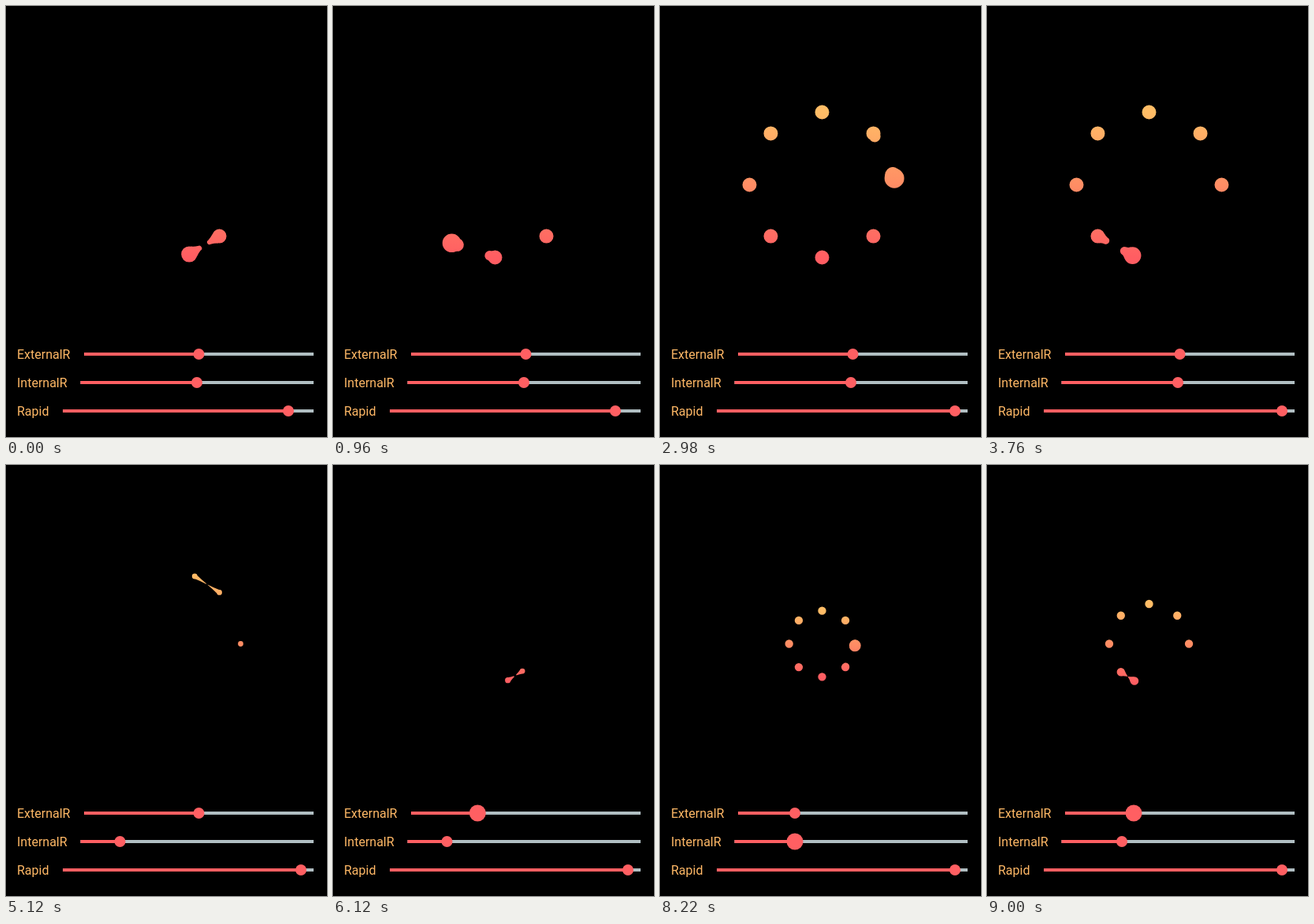
Recreate the animation shown at these times as an HTML page. Size 407 px wide and 546 px high, loop 9.02 s.

```html
<!DOCTYPE html>
<html lang="en">
<head>
<meta charset="utf-8">
<title>Loading ring</title>
<style>
html, body { margin: 0; width: 100%; height: 100%; overflow: hidden; background: #000; }
svg { display: block; width: 100vw; height: 100vh; }
text { font: 16px Roboto, sans-serif; fill: #ffb866; }
</style>
</head>
<body>
<svg id="stage" viewBox="0 0 407 546">
  <defs>
    <linearGradient id="glow" gradientUnits="userSpaceOnUse" x1="0" x2="0">
      <stop offset="0" stop-color="#ffbd66"/>
      <stop offset="1" stop-color="#ff5d62"/>
    </linearGradient>
  </defs>
  <path id="tails" fill="url(#glow)"/>
  <path id="dots" fill="url(#glow)"/>
</svg>
<script>
const LOOP = 9020, CX = 205.5, CY = 226.5, STEP = 45, TRACK_END = 390;
const stage = document.getElementById('stage');
const glow = document.getElementById('glow');
const tails = document.getElementById('tails');
const dots = document.getElementById('dots');

// Angle travelled by the ball, in degrees, as [ms, value] pairs.
const travel = [[0, 73], [1450, 154], [1580, 163.8], [1710, 179.5], [1880, 203],
  [2980, 354.7], [3760, 463], [5120, 651.4], [7400, 968.6], [9020, 1194.2]];

const sliders = [
  { label: 'ExternalR', y: 441, start: 99, presses: [[5400, 6330], [8650, 9900]],
    knob: [[5480, 244.5], [6250, 171], [8750, 171], [8980, 186]] },
  { label: 'InternalR', y: 477, start: 94.5, presses: [[3820, 4480], [7750, 8230]],
    knob: [[3900, 242], [4400, 144.5], [7850, 144.5], [8150, 171]] },
  { label: 'Rapid', y: 513, start: 72, presses: [[1350, 1730]],
    knob: [[1450, 358], [1710, 374]] }
];
const [external, internal] = sliders;

const clamp = v => Math.max(0, Math.min(1, v));

function lerpKeys(keys, t) {
  if (t <= keys[0][0]) return keys[0][1];
  for (let i = 1; i < keys.length; i++) {
    const [t0, v0] = keys[i - 1], [t1, v1] = keys[i];
    if (t <= t1) return v0 + (v1 - v0) * (t - t0) / (t1 - t0);
  }
  return keys[keys.length - 1][1];
}

function add(tag, attrs) {
  const el = document.createElementNS('http://www.w3.org/2000/svg', tag);
  set(el, attrs);
  return stage.appendChild(el);
}

function set(el, attrs) {
  for (const name in attrs) el.setAttribute(name, attrs[name]);
}

for (const s of sliders) {
  add('text', { x: 14, y: s.y + 6 }).textContent = s.label;
  const line = { x1: s.start, y1: s.y, x2: TRACK_END, y2: s.y, 'stroke-width': 4 };
  add('line', { ...line, stroke: '#b0bec2' });
  s.fill = add('line', { ...line, stroke: '#ff5f62' });
  s.handle = add('circle', { cy: s.y, fill: '#ff5f62' });
}

function drawSlider(s, t) {
  const x = lerpKeys(s.knob, t);
  const press = Math.max(...s.presses.map(([a, b]) =>
    Math.min(clamp((t - a) / 100), clamp((b + 100 - t) / 100))));
  set(s.fill, { x2: x });
  set(s.handle, { cx: x, r: 7 + 3.5 * press });
}

const fraction = (s, t) => (lerpKeys(s.knob, t) - s.start) / (TRACK_END - s.start);

function onRing(deg, ring, r) {
  const a = deg * Math.PI / 180;
  return { x: CX + ring * Math.cos(a), y: CY + ring * Math.sin(a), r };
}

const circle = ({ x, y, r }) =>
  `M${x - r} ${y}a${r} ${r} 0 1 1 ${2 * r} 0a${r} ${r} 0 1 1 ${-2 * r} 0Z`;

// Taper from one circle towards another; gap is 0 when they coincide, 1 a full step apart.
function tail(from, to, gap) {
  const dx = to.x - from.x, dy = to.y - from.y, dist = Math.hypot(dx, dy);
  if (dist < 0.01) return '';
  const { x, y, r } = from, ux = dx / dist, uy = dy / dist;
  const at = (along, across) =>
    `${x + ux * along - uy * across} ${y + uy * along + ux * across}`;
  const loose = clamp(2 * gap - 1);
  const linked = gap < 0.5;
  const width = linked ? 0.77 * r * (1 - 2 * gap) : r * loose ** 0.8;
  const reach = linked ? dist / 2 : r + (dist / 2 - r) * (1 - loose) ** 1.5;
  const end = linked ? reach : reach - width;
  const rootX = 0.64 * r, rootY = 0.77 * r;
  const midX = (rootX + end) / 2, midY = (rootY + width) / 2 - 0.08 * r;
  const cap = linked ? `L${at(end, width)}` : `A${width} ${width} 0 0 1 ${at(end, width)}`;
  return `M${at(rootX, -rootY)}Q${at(midX, -midY)} ${at(end, -width)}${cap}` +
    `Q${at(midX, midY)} ${at(rootX, rootY)}Z`;
}

function drawRing(t) {
  const ring = t < 5480 ? 92 : 169 * fraction(external, t);
  const r = t < 3900 ? 9 : 20 * fraction(internal, t);
  const angle = lerpKeys(travel, t) % 720;
  const phase = angle % STEP / STEP;
  const ball = onRing(angle, ring, r * (1 + 0.5 * Math.abs(1 - 2 * phase)));

  // The first lap leaves dots behind, the second collects them.
  let shapes = circle(ball);
  for (let k = 1; k <= 8; k++)
    if (angle >= k * STEP && angle < 360 + k * STEP) shapes += circle(onRing(k * STEP, ring, r));

  let joins = '';
  const join = (deg, gap) => {
    const dot = onRing(deg, ring, r);
    joins += tail(ball, dot, gap) + tail(dot, ball, gap);
  };
  const passed = Math.floor(angle / STEP) * STEP;
  if (angle >= STEP && angle < 360 + STEP) join(passed, phase);
  if (angle >= 360) join(passed + STEP, 1 - phase);

  set(glow, { y1: CY - ring, y2: CY + ring });
  set(dots, { d: shapes });
  set(tails, { d: joins });
}

function render(t) {
  drawRing(t);
  for (const s of sliders) drawSlider(s, t);
}

const began = performance.now();
function tick() {
  render((performance.now() - began) % LOOP);
  requestAnimationFrame(tick);
}
tick();
</script>
</body>
</html>
```
